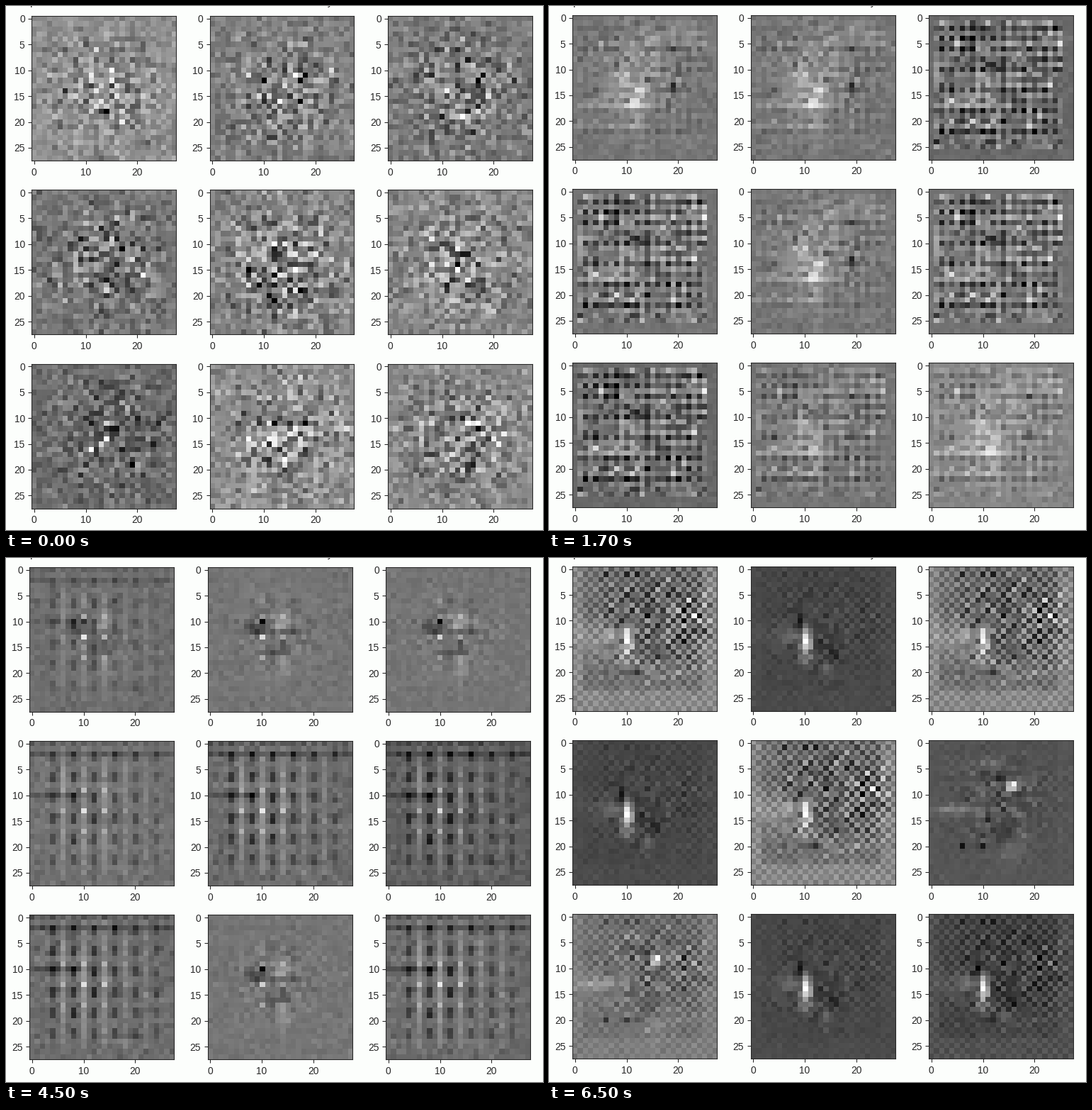
Write a matplotlib script that moves like this. It is 758 px wide and 739 px high and loops after 8000 ms.

```python
import matplotlib.pyplot as plt
import numpy as np
from matplotlib.animation import FuncAnimation

W, H, DPI = 758, 739, 64
PX = 72 / DPI  # points per pixel
N, SIDE = 28, 204
PITCH_X, PITCH_Y = 251.5, 245.2
PAPER, INK = "#fcfefc", "#262626"
CAPTION = ("Snap features of the trained hidden filters after each round shown barely "
           "under a lattice of random norms and masks too")

plt.rcParams["font.family"] = "Liberation Sans"
Y, X = np.mgrid[0:N, 0:N]
INSIDE = (X > 0) & (X < 26) & (Y > 0) & (Y < 26)
EVEN_X, EVEN_Y = X % 2 == 0, Y % 2 == 0


def noise(seed):
    return np.random.default_rng(seed).normal(size=(N, N))


def bump(cx, cy, rx, ry):
    return np.exp(-((X - cx) / rx) ** 2 - ((Y - cy) / ry) ** 2)


def stretch(field):
    return (field - field.min()) / np.ptp(field)


def arrange(layout, kinds, seed, grain=0.018):
    """Fill the nine panels with the fields named by the layout's letters."""
    return [np.clip(kinds[name] + grain * noise(seed + k), 0, 1)
            for k, name in enumerate(layout)]


def static_scene():
    spread = 0.18 + 0.65 * bump(14, 14, 9.5, 10)
    return [stretch(spread * noise(10 + k)) for k in range(9)]


def dotted_scene():
    left = X < 15
    low_rows = np.isin(Y, (17, 21)) & left
    glow = (noise(31) * (0.015 + 0.075 * bump(13, 9, 11, 9))
            + 0.15 * bump(11, 12, 5, 7) + 0.1 * bump(20, 3, 5, 2)
            + 0.06 * low_rows + 0.08 * bump(12, 22, 0.8, 5)
            + 0.35 * bump(13, 14, 1.3, 0.8) + 0.35 * bump(12, 16.5, 1.4, 0.9)
            - 0.5 * bump(19, 13.5, 0.5, 0.9) - 0.3 * bump(19, 6, 0.5, 0.5))
    dots = INSIDE * (
        0.1 * noise(32)
        - 0.13 * abs(noise(33)) * (EVEN_X & EVEN_Y)
        - 0.13 * (EVEN_X & (Y % 4 == 2))
        + 0.09 * ~EVEN_X * ~EVEN_Y
        + 0.08 * (~EVEN_Y & (Y < 14) & ~left)
        + 0.1 * low_rows
        + 0.35 * ((X % 4 == 0) & np.isin(Y, (16, 20)) & left)
        + 0.3 * bump(9.5, 6, 0.9, 0.5)
        - 0.4 * bump(11.5, 9, 0.9, 0.5)
        - 0.2 * ((Y == 4) & EVEN_X & left))
    kinds = {
        "glow": 0.46 + glow + 0.2 * dots,
        "dots": 0.45 + dots,
        "dark": 0.41 + dots + 0.2 * glow,
        "both": 0.46 + 0.6 * glow + 0.55 * dots,
        "pale": 0.52 + 0.75 * glow + 0.45 * dots,
    }
    return arrange("glow glow dark dots glow dots dark both pale".split(), kinds, 40)


def striped_scene():
    rungs = (X % 4 == 3) & (X < 24)
    fade = 1 - 0.6 * (X > 15)
    stripes = fade * (Y > 1) * (0.07 * EVEN_X - 0.07 * ~EVEN_X - 0.12 * rungs)
    stripes = stripes + INSIDE * (0.04 * noise(51) - 0.13 * (rungs & (Y % 4 == 1) & (X > 4)))
    corner = (noise(52) * (0.035 + 0.09 * bump(20, 14, 5, 7))
              - 0.25 * (rungs & np.isin(Y, (18, 22)) & (X > 10))
              - 0.2 * bump(15, 18, 0.5, 0.5) - 0.2 * bump(23, 18, 0.5, 0.5)
              + 0.28 * bump(15, 20, 2, 0.6) + 0.25 * bump(22, 8, 0.5, 0.9))
    clump = (noise(53) * (0.02 + 0.16 * bump(10, 15, 4, 8) + 0.08 * bump(19, 14, 5, 9))
             - 0.12 * bump(10, 15, 4, 5)
             - 0.25 * (rungs & np.isin(Y, (9, 18, 22)) & (X > 11))
             + 0.3 * bump(11, 10, 3, 1) + 0.5 * bump(13, 11, 0.5, 1.2)
             + 0.55 * bump(13, 14, 0.5, 0.5) - 0.3 * bump(11.5, 14, 0.9, 0.6))
    kinds = {
        "stripes": 0.63 + 0.9 * stripes + 0.6 * corner,
        "columns": 0.51 + 1.4 * stripes + 0.35 * corner,
        "clump": 0.37 + clump + 0.1 * stripes,
        "blend": 0.46 + clump + 0.4 * stripes,
        "corner": 0.61 + 0.9 * corner + 0.35 * stripes,
        "muted": 0.53 + 0.9 * corner + 0.4 * stripes,
    }
    layout = "stripes clump corner muted muted clump columns corner blend"
    return arrange(layout.split(), kinds, 60)


def lattice_scene():
    peaks = (X % 4 == 2) & (Y % 4 == 1)
    swirl = (noise(71) * (0.01 + 0.08 * bump(13, 12, 6, 6))
             + 0.2 * bump(13.5, 10.5, 1.8, 1.8) - 0.15 * bump(9, 11, 2, 1.6)
             - 0.35 * bump(10, 10, 0.6, 0.6)
             - 0.17 * bump(12, 12, 4, 0.6) - 0.17 * bump(13, 16, 2, 0.6)
             - 0.15 * bump(11.5, 14.5, 0.9, 0.9)
             + 0.1 * bump(14, 19, 1.5, 2)
             + 0.5 * peaks * bump(11, 13, 2.5, 5))
    reach = 0.4 + 0.6 * bump(9, 12, 9, 10)
    grid = INSIDE * reach * (
        0.15 * ((X % 4 == 2) & (X > 4))
        + 0.06 * (~EVEN_X & EVEN_Y)
        - 0.08 * (~EVEN_X & (Y % 4 == 2))
        - 0.27 * ((X % 4 == 0) & np.isin(Y % 4, (2, 3))))
    grid = (grid + 0.35 * peaks * bump(10, 13, 6, 5)
            - 0.06 * (Y == 2) - 0.1 * ((Y % 2 == 0) & (Y < 3) & EVEN_X)
            - 0.12 * ((Y == 10) & (X < 10)) + 0.025 * noise(72))
    kinds = {
        "swirl": 0.46 + swirl + 0.06 * grid,
        "blend": 0.43 + 0.7 * swirl + 0.5 * grid,
        "soft": 0.44 + 0.25 * swirl + 0.8 * grid,
        "grid": 0.42 + grid,
        "dark": 0.37 + 0.15 * swirl + 0.95 * grid,
    }
    return arrange("blend swirl swirl soft grid dark grid swirl grid".split(), kinds, 80)


def checker_scene():
    sign = np.where((X + Y) % 2 == 0, 1, -1)
    checks = (sign * (0.05 + abs(noise(90)) * (0.2 * bump(22, 11, 4, 9) + 0.12 * bump(11, 6, 9, 7)))
              + 0.1 * noise(91) * bump(13, 13, 10, 10)
              - 0.1 * bump(14, 6, 9, 9)
              + 0.08 * ((X > 24) | (Y > 23) | (X < 2))
              + 0.1 * bump(4, 13, 4, 3)
              - 0.2 * (np.isin(X, (6, 10, 12)) & np.isin(Y, (1, 20))))
    flare = (noise(92) * 0.06 * bump(12, 13, 7, 8)
             + 0.7 * bump(10.2, 13.8, 0.9, 1.8) + 0.2 * bump(10, 16.5, 1.1, 1.8)
             + 0.08 * bump(7, 13, 3, 2) + 0.15 * bump(14, 19.5, 0.7, 1.2)
             - 0.25 * bump(9, 10, 0.5, 1.6) - 0.2 * bump(15.5, 16.5, 0.9, 0.9))
    star = (noise(93) * 0.07 * bump(13, 12, 9, 9)
            + 0.75 * bump(15.7, 8.4, 1, 0.9) + 0.2 * bump(5, 13, 4, 0.8)
            + 0.1 * bump(15, 20, 3, 3) + 0.1 * bump(11, 4, 3, 1)
            - 0.25 * bump(13.5, 6.5, 1.1, 0.8) - 0.15 * bump(14, 18, 2, 2)
            - 0.25 * (np.isin(X, (6, 10)) & (Y == 20)))
    kinds = {
        "checks": 0.46 + checks + 0.7 * flare,
        "flare": 0.28 + flare + 0.18 * checks,
        "dusk": 0.28 + flare + 0.5 * checks,
        "star": 0.33 + star + 0.1 * checks,
        "pale": 0.45 + 0.8 * star + 0.55 * checks,
    }
    layout = "checks flare checks flare checks star pale flare dusk"
    return arrange(layout.split(), kinds, 100, 0.01)


SCENES = [static_scene(), dotted_scene(), striped_scene(), lattice_scene(), checker_scene()]


def origin(scene):
    if scene == 0:
        return 36, 14.2
    return 33, 13 - (scene + 1) % 2


def place(ax, k, scene):
    left, top = origin(scene)
    left += k % 3 * PITCH_X
    top += k // 3 * PITCH_Y
    ax.set_position([left / W, 1 - (top + SIDE) / H, SIDE / W, SIDE / H])


fig = plt.figure(figsize=(W / DPI, H / DPI), dpi=DPI, facecolor=PAPER)
# Only the feet of the caption reach into the picture.
fig.text(9 / W, 1 + 1 / H, CAPTION, va="baseline", size=14 * PX, color=INK)

axes, images = [], []
for k in range(9):
    ax = fig.add_axes([0, 0, 0.1, 0.1], label=str(k))
    images.append(ax.imshow(SCENES[0][k], cmap="gray", vmin=0, vmax=1,
                            interpolation="nearest", aspect="auto"))
    ax.set_xticks(range(0, 21, 10))
    ax.set_yticks(range(0, 26, 5))
    ax.tick_params(length=4.67 * PX, width=1.07 * PX, pad=4.67 * PX,
                   labelsize=13.8 * PX, color=INK, labelcolor=INK)
    for spine in ax.spines.values():
        spine.set(linewidth=1.07 * PX, edgecolor=INK)
    axes.append(ax)


def draw(frame):
    scene = (frame + 3) // 4
    for k, (ax, image) in enumerate(zip(axes, images)):
        place(ax, k, scene)
        image.set_data(SCENES[scene][k])
    return images


anim = FuncAnimation(fig, draw, frames=16, interval=500, repeat=True,
                     repeat_delay=0, blit=False)
plt.show()
```
